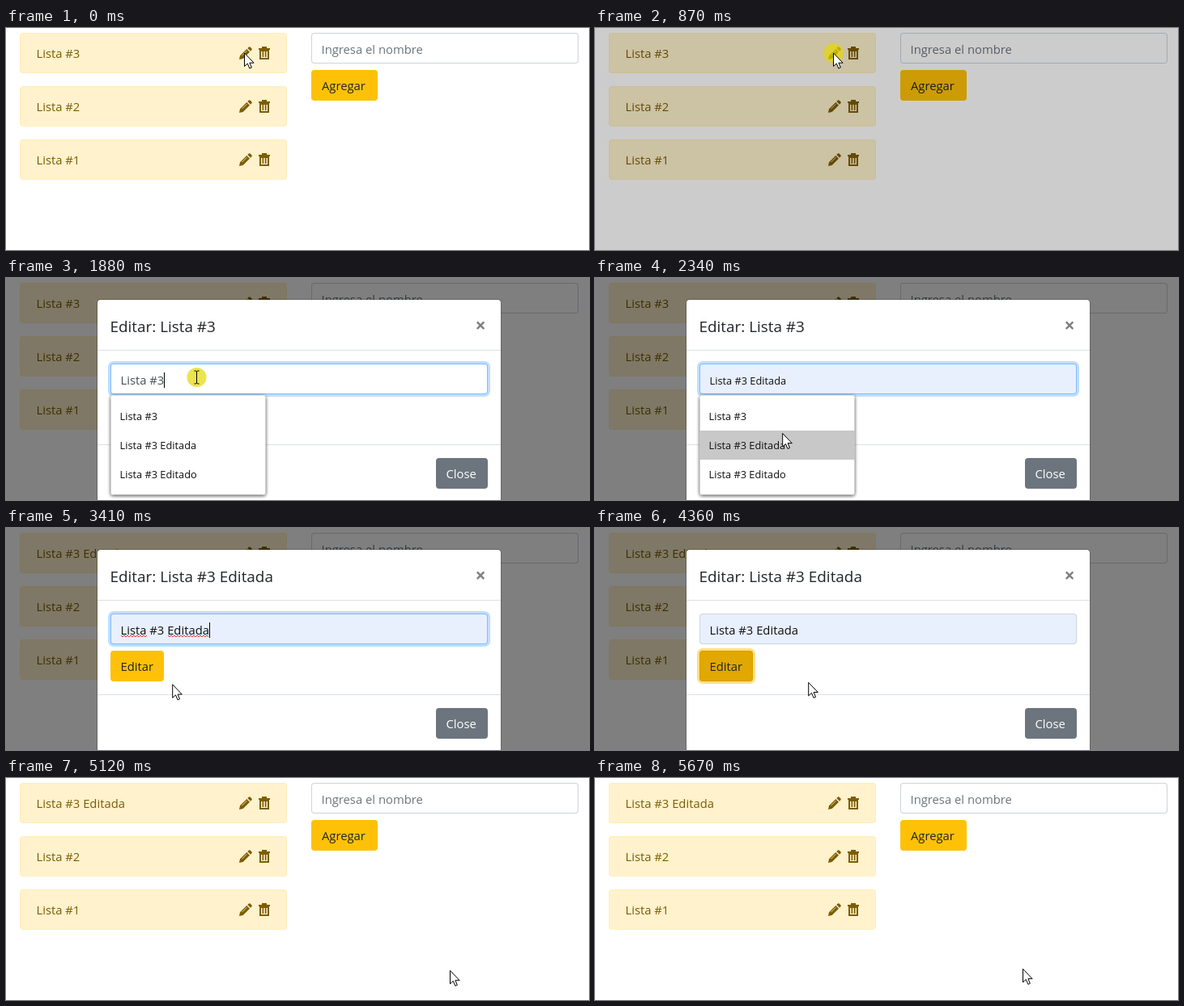
An HTML page with a canvas for the animation above (5980 ms loop, 720 by 275 pixels).

```html
<!DOCTYPE html>
<html lang="es">
<head>
<meta charset="utf-8">
<title>Editar lista</title>
<style>
html, body { margin: 0; width: 100%; height: 100%; overflow: hidden; background: #fff; }
canvas { display: block; }
</style>
</head>
<body>
<canvas id="stage" width="720" height="275"></canvas>
<script>
const LOOP = 5980;
const FONT = '"Open Sans", "Noto Sans", sans-serif';
const BROWN = '#7d5d03', AMBER = '#ffc107', AMBER_DARK = '#e0a800';
const c = document.getElementById('stage').getContext('2d');

const ARROW = new Path2D('M0 0V16.5L3.8 13L6.3 19L8.8 18L6.4 12.2H11.6Z');
const HAND = new Path2D('M-1.5 1.5Q0-1 1.5 1.5V8Q3.5 6.5 4.5 8.7Q6.5 7.5 7.5 9.7Q10 9 10 12V15Q10 18 8 20V22H-1V20L-5 14Q-6 11-3.5 12L-1.5 14Z');
const PENCIL = new Path2D('M0 16L1 11.3L9.3 3L13 6.7L4.7 15ZM10.3 2L12 .4Q12.7 0 13.5 .5L15.5 2.5Q16 3.3 15.6 4L14 5.7Z');

// Easing curves
const out = p => u => 1 - (1 - u) ** p;
const rush = p => u => u ** p;
const smooth = u => { u **= 1.1; return u * u * (3 - 2 * u); };

// Cursor moves: first change, last change, steps, end point, easing
const HOME = [294.5, 31];
const MOVES = [
  [1260, 1650, 6, 235.5, 123, out(1.3)],
  [2030, 2490, 7, 231, 205, out(1.5)],
  [3040, 3570, 8, 181, 183, rush(1.45)],
  [3650, 3720, 2, 170, 175, out(1)],
  [4190, 4740, 8, 519.5, 236, smooth],
  [4820, 4970, 3, 548.5, 239.5, out(1.6)],
  [5120, 5121, 1, 548.5, 238.5, out(1)],
  [5290, 5670, 6, 528.5, 236.5, out(1.5)]
];
const CLICKS = [800, 1880, 2890, 4040, 4970];
const OPTIONS = ['Lista #3', 'Lista #3 Editada', 'Lista #3 Editado'];

function cursorAt(t) {
  let [x, y] = HOME;
  for (const [start, end, n, toX, toY, ease] of MOVES) {
    if (t < start) break;
    const step = (end - start) / Math.max(1, n - 1);
    const u = ease(Math.min(n, Math.floor((t - start) / step + 0.08) + 1) / n);
    x += (toX - x) * u;
    y += (toY - y) * u;
  }
  return [x, y];
}

function rect(x, y, w, h, color) {
  c.fillStyle = color;
  c.fillRect(x, y, w, h);
}

function box(x, y, w, h, fill, border = fill, radius = 4, ring) {
  const shape = (d, r, color) => {
    c.beginPath();
    c.roundRect(x - d, y - d, w + 2 * d, h + 2 * d, r);
    c.fillStyle = color;
    c.fill();
  };
  if (ring) shape(3, radius + 3, ring);
  shape(0, radius, border);
  shape(-1, radius - 1, fill);
}

function text(str, x, y, color, size = 14.8, weight = 400) {
  c.font = `${weight} ${size}px ${FONT}`;
  c.fillStyle = color;
  c.fillText(str, x, y);
  return x + c.measureText(str).width;
}

function squiggle(from, to, y) {
  c.beginPath();
  for (let x = from, i = 0; x <= to; x += 2, i++) c.lineTo(x, y + (i % 2 ? 1 : -1));
  c.strokeStyle = '#f03a3a';
  c.lineWidth = 1;
  c.stroke();
}

function listItem(label, y) {
  box(17, y, 330, 50, '#fff2cd', '#ffeeba');
  text(label, 37.5, y + 31, BROWN);
  c.save();
  c.translate(288, y + 17);
  c.fillStyle = BROWN;
  c.fill(PENCIL);
  c.strokeStyle = '#fff2cd';
  c.lineWidth = 0.8;
  c.beginPath();
  c.moveTo(3.4, 11.2);
  c.lineTo(9.4, 5.2);
  c.stroke();
  c.translate(24, 0);
  rect(4, 0, 6, 2, BROWN);
  rect(0, 2, 14, 2, BROWN);
  c.strokeStyle = BROWN;
  c.lineWidth = 2;
  c.strokeRect(2, 5, 10, 10);
  rect(4.5, 6, 1.7, 7, BROWN);
  rect(7.8, 6, 1.7, 7, BROWN);
  c.restore();
}

function page(edited) {
  rect(0, 0, 720, 275, '#fff');
  ['Lista #3' + (edited ? ' Editada' : ''), 'Lista #2', 'Lista #1']
    .forEach((label, i) => listItem(label, 6 + 66 * i));
  box(377, 6, 330, 38, '#fff', '#ced4da');
  text('Ingresa el nombre', 389.5, 32, '#6c757d');
  box(377, 52, 82, 38, AMBER);
  text('Agregar', 390, 77, '#212529');
}

function field(t, picked, edited) {
  const focused = t >= 1800 && t < 4040;
  const preview = picked >= 0;
  const ring = focused && `rgba(0,123,255,${t < 1880 ? 0.12 : 0.25})`;
  box(129, 106, 466, 38, preview || edited ? '#e8f0fe' : '#fff', focused ? '#80bdff' : '#ced4da', 4, ring);
  const value = preview ? OPTIONS[picked] : OPTIONS[edited ? 1 : 0];
  const end = text(value, 141.5, 132, preview || edited ? '#111' : '#495057', preview ? 12.8 : 14.8);
  if (!focused || preview) return;
  rect(Math.round(end), 117, 1, 19, '#000');
  if (edited) {
    squiggle(142, 174, 134);
    squiggle(200, 251, 134);
  }
}

function dropdown(picked) {
  c.save();
  c.shadowColor = 'rgba(0,0,0,.45)';
  c.shadowBlur = 4;
  c.shadowOffsetY = 1;
  box(129, 145, 192, 124, '#fff', '#fff', 3);
  c.restore();
  if (picked >= 0) rect(129, 153 + 36 * picked, 192, 36, '#c8c8c8');
  OPTIONS.forEach((label, i) => text(label, 140.5, 176 + 36 * i, '#111', 12.8));
}

function modal(t, s) {
  box(112, 26, 500, 270, '#fff', 'rgba(0,0,0,.2)', 5);
  text('Editar: Lista #3' + (s.edited ? ' Editada' : ''), 128.5, 67, '#212529', 18.9, 500);
  text('×', 579.5, 66.5, '#7f7f7f', 23, 700);
  rect(113, 89, 498, 1, '#dee2e6');
  field(t, s.picked, s.edited);

  const editFocus = t >= 4040 && t < 4970;
  const editDark = s.overEdit || editFocus;
  box(129, 152, 66, 38, editDark ? AMBER_DARK : AMBER, editDark ? '#d39e00' : AMBER, 4,
    editFocus && 'rgba(255,193,7,.5)');
  text('Editar', 141.5, 177, '#212529');

  rect(113, 206, 498, 1, '#dee2e6');
  const closeFocus = t >= 4970;
  box(531, 223, 64, 38, closeFocus ? '#545b62' : s.overClose ? '#5a6268' : '#6c757d', undefined, 4,
    closeFocus && 'rgba(130,138,145,.5)');
  text('Close', 543.5, 248, '#fff');
  if (s.listOpen) dropdown(s.picked);
}

function pointer(x, y, kind) {
  c.save();
  c.translate(x, y);
  c.lineWidth = 1;
  c.strokeStyle = '#000';
  c.fillStyle = '#fff';
  if (kind === 'beam') {
    c.stroke(new Path2D('M-3-8H-1L0-7L1-8H3M0-7V7M-3 8H-1L0 7L1 8H3'));
  } else {
    const shape = kind === 'hand' ? HAND : ARROW;
    c.fill(shape);
    c.stroke(shape);
    if (kind === 'hand') c.stroke(new Path2D('M1.5 8V11M4.5 9V12M7.5 10V13'));
  }
  c.restore();
}

function draw(t) {
  const [x, y] = cursorAt(t);
  const within = (l, top, r, b) => x >= l && x < r && y >= top && y < b;
  const open = t >= 800 && t < 5120;
  const listOpen = t >= 1880 && t < 3040;
  const s = {
    listOpen,
    edited: t >= 3040,
    picked: listOpen && y >= 153 ? Math.floor((y - 153) / 36) : -1,
    overEdit: t >= 3040 && within(129, 152, 195, 190),
    overClose: within(531, 223, 595, 261)
  };

  page(s.edited);
  if (open) {
    const stage = Math.min(2, Math.floor((t - 800) / 80));
    rect(0, 0, 720, 275, `rgba(0,0,0,${[0.2, 0.45, 0.5][stage]})`);
    c.save();
    c.globalAlpha = [0, 0.6, 1][stage];
    c.translate(0, [-40, -14, 0][stage]);
    modal(t, s);
    c.restore();
  }

  if (CLICKS.some(at => t >= at && t < at + 150)) {
    c.beginPath();
    c.arc(x, y, 12, 0, 7);
    c.fillStyle = 'rgba(228,216,0,.7)';
    c.fill();
  }
  const onField = open && within(129, 106, 595, 144);
  pointer(x, y, onField ? 'beam' : open && (s.overEdit || s.overClose) ? 'hand' : 'arrow');
}

const begin = performance.now();
function tick() {
  draw((performance.now() - begin) % LOOP);
  requestAnimationFrame(tick);
}
tick();
</script>
</body>
</html>
```
